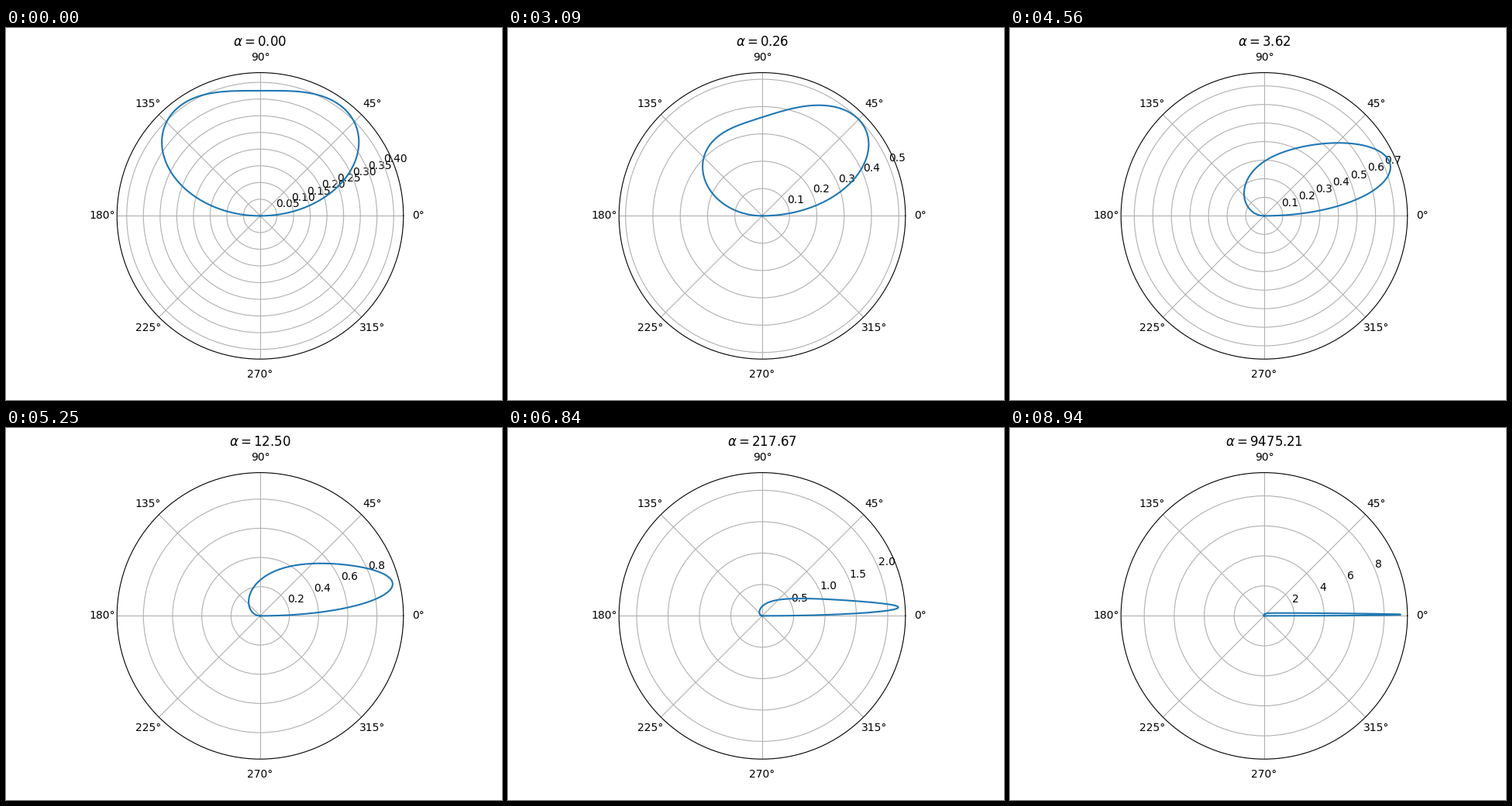
These frames come from a looping animation (640 px wide and 480 px high, 8970 ms). A matplotlib script:

```python
import numpy as np
import matplotlib.pyplot as plt
from matplotlib.animation import FuncAnimation

FRAMES = 299
theta = np.linspace(0, np.pi, 1000)
alphas = np.logspace(-3, 4, FRAMES + 1)


def density(alpha):
    """Klein-Nishina angular density, normalised over theta."""
    p = 1 / (1 + alpha * (1 - np.cos(theta)))
    f = p**2 * (p + 1 / p - np.sin(theta)**2) * np.sin(theta)
    return f / np.trapezoid(f, theta) if hasattr(np, "trapezoid") else f / np.trapz(f, theta)


def label(alpha):
    return rf"$\alpha = {alpha:.2f}$"


fig = plt.figure(figsize=(6.4, 4.8), dpi=100)
ax = fig.add_subplot(projection="polar")
line, = ax.plot(theta, density(alphas[0]))


def update(i):
    r = density(alphas[i])
    line.set_data(theta, r)
    ax.set_ylim(0, 1.05 * r.max())
    ax.title.set_text(label(alphas[i]))
    return line, ax.title


# Lay out once, then pin the title height above the angle labels
update(0)
fig.canvas.draw()
ax.set_title(label(alphas[0]), y=ax.title.get_position()[1])

anim = FuncAnimation(fig, update, frames=FRAMES, interval=30,
                     repeat=True, repeat_delay=0, blit=False)
plt.show()
```
